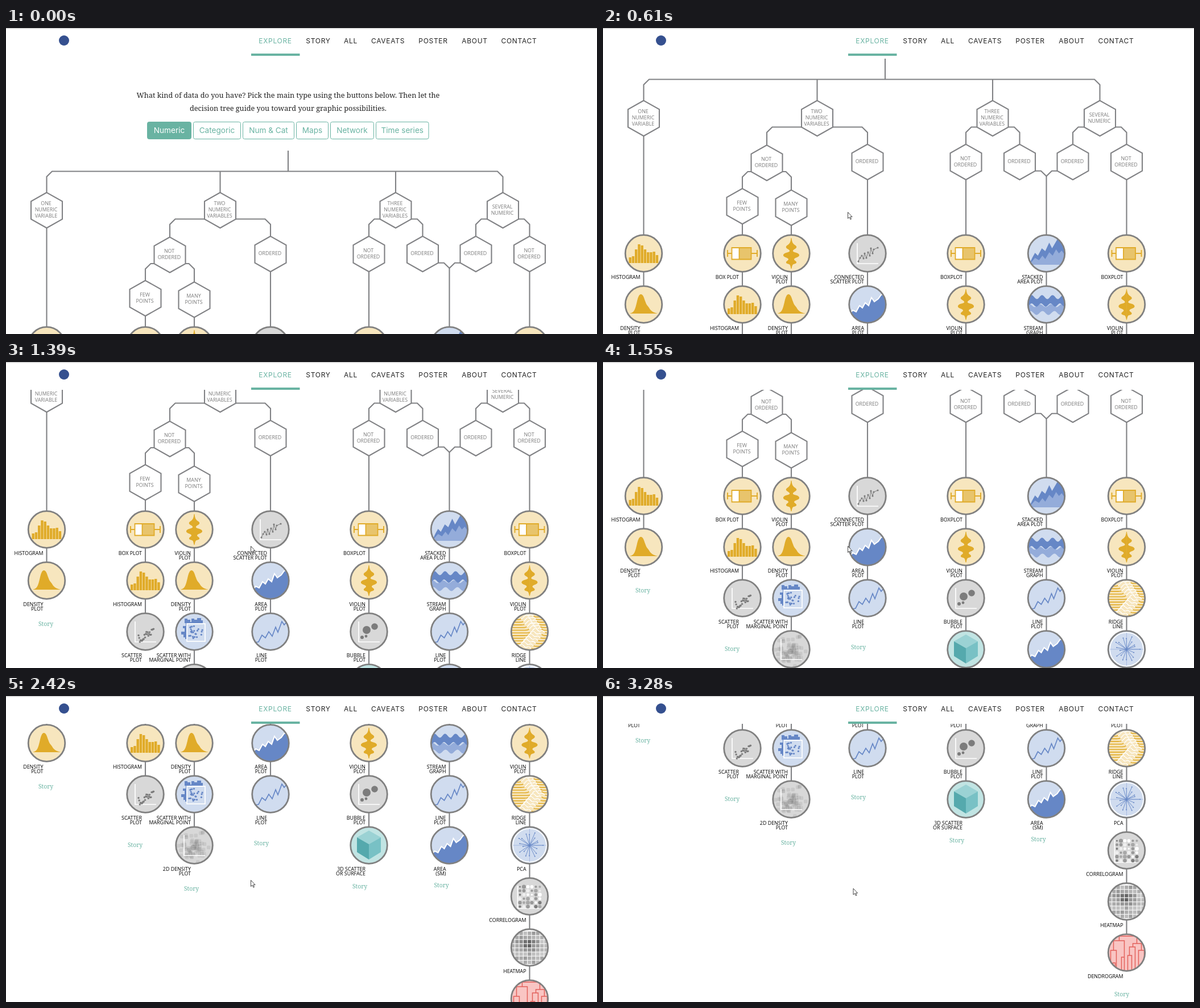
Recreate the animation shown at these times as an HTML page. Size 1039x539 px, loop 3360 ms.

```html
<!DOCTYPE html>
<html lang="en">
<head>
<meta charset="utf-8">
<title>Chart decision tree</title>
<style>
  html, body { margin: 0; width: 100%; height: 100%; overflow: hidden; background: #fff; }
  svg { display: block; width: 1039px; height: 539px; }
  .nav { font: 12px Inter, sans-serif; letter-spacing: .7px; fill: #222; text-anchor: middle; }
  .btn { font: 13.6px Inter, sans-serif; text-anchor: middle; }
  .lead { font: 12.7px "Noto Serif", serif; fill: #222; text-anchor: middle; }
  .story { font: 10.4px "Noto Serif", serif; fill: #69b3a2; text-anchor: middle; }
  .node { font: 8.9px "Open Sans", sans-serif; fill: #7a7a7a; text-anchor: middle; }
  .label { font: 8.9px "Open Sans", sans-serif; fill: #000; text-anchor: end; }
  .wire { fill: none; stroke: #808184; stroke-width: 2.1; }
  .hex { fill: #fff; stroke: #808184; stroke-width: 2.1; }
</style>
</head>
<body>
<svg viewBox="0 0 1039 539" xmlns="http://www.w3.org/2000/svg">
  <defs><clipPath id="disc"><circle r="32"/></clipPath></defs>
  <g id="page"></g>
  <g id="header"></g>
  <path id="cursor" d="M0 0V11L2.6 8.7 4.4 12.7 6 12 4.3 8.1H7.6Z" fill="#fff" stroke="#333" stroke-width=".9"/>
</svg>
<script>
const GREEN = '#69b3a2', GOLD = '#e0ab29', BLUE = '#6687c6', PALE_BLUE = '#94acda', GRAY = '#7c7c7c';
const LOOP = 3360;

// Seeded generator, so that scattered marks are always the same.
function random(seed) {
  return () => {
    seed = (seed * 16807) % 2147483647;
    return seed / 2147483647;
  };
}
const range = (n, f) => Array.from({ length: n }, (_, i) => f(i)).join('');
const text = (cls, x, y, s, extra = '') => `<text class="${cls}" x="${x}" y="${y}" ${extra}>${s}</text>`;
const rect = (x, y, w, h, fill, extra = '') =>
  `<rect x="${x}" y="${y}" width="${w}" height="${h}" fill="${fill}" ${extra}/>`;
const dot = (x, y, r, fill, extra = '') => `<circle cx="${x}" cy="${y}" r="${r}" fill="${fill}" ${extra}/>`;
const line = (d, color, w) => `<path d="${d}" fill="none" stroke="${color}" stroke-width="${w}"/>`;
const shape = (d, fill, extra = '') => `<path d="${d}" fill="${fill}" ${extra}/>`;
const wire = d => `<path class="wire" d="${d}"/>`;
const axes = (x = -18, y = 18) => line(`M${x} -18V${y}H19`, '#fff', 1.7);

const RISE = '-33 19 -26 10 -20 13 -14 2 -9 6 -4 -3 2 2 7 -12 12 -5 19 -10 24 -17 33 -21';

const icons = {
  hist: () => [10, 12, 24, 33, 31, 24, 19, 19, 20, 14]
    .map((h, i) => rect(-26 + 5.25 * i, 17 - h, 4.4, h, GOLD)).join(''),

  density: () => shape('M-24.5 16C-16 14-15 8-12-4C-10-13-8-18-5-18C-1-18 0-13 3-5C5 1 6 1 9 5C12 11 16 14 25 16Z', GOLD),

  box: () => line('M-26 0H-19M15 0H26M-26-6V6M26-6V6', GOLD, 1.9) +
    rect(-18.5, -10, 13, 20.5, '#fff') + rect(-5.5, -10, 21, 20.5, '#e8c46c') +
    line('M-18.5-10H15.5V10.5H-18.5ZM-5.5-10V10.5', GOLD, 1.8),

  violin: () => [1, -1].map(s => shape(
    'M-.2-27H.4C1.5-20 2-18 6-15C10.5-12 10.5-10 5-7C2-5 2-3 6-2C16 0 16 5 10 7C4 9 4 11 7 13C11 16 9 18 4 19C1.5 20 1.5 23 .4 27H-.2Z',
    GOLD, `transform="scale(${s} 1)"`)).join(''),

  connected: () => {
    const pts = [[-16, 14], [-13, 8], [-10, 4], [-7, 9], [-5, 0], [-2, 8], [1, -2], [4, 4], [6, -9], [9, 0], [11, -7], [18, -10]];
    return axes() + line('M' + pts.join(' '), GRAY, 1) + pts.map(p => dot(p[0], p[1], 1.6, GRAY)).join('');
  },

  area: () => shape(`M${RISE} 33 33-33 33Z`, BLUE) + line(`M${RISE}`, '#fff', 2),

  line: () => line('M-28 19-21 18-15 6-9 11-3 0 3 8 9-8 13 1 20-18 24-12 29-18', BLUE, 1.7),

  scatter: () => {
    const rnd = random(41);
    return axes() + range(24, i => {
      const x = -12 + i * 1.15;
      return dot(x, 7 - x * .5 + (rnd() - .5) * 13, 1.7, GRAY);
    });
  },

  marginal: () => {
    const rnd = random(97);
    return shape('M-17-23H-12V-21H-7V-17H-5V-23H0V-21H5V-24H12V-20H15V-15H-17Z', BLUE) +
      shape('M-15-15V-10H-20V-6H-17V0H-23V5H-19V10H-16V13H-13.5V-15Z', BLUE) +
      `<rect x="-13" y="-14" width="32" height="31" fill="#d0dcef" stroke="#fff" stroke-width="1.7"/>` +
      range(24, () => dot(-9 + rnd() * 24, -10 + rnd() * 23, 1.6, BLUE));
  },

  density2d: () => {
    const rnd = random(23);
    const spread = w => (rnd() + rnd() + rnd() - 1.5) * w;
    return range(75, () => {
      const x = spread(22), y = spread(24);
      return rect(x - 3 - y * .15, y - 3, 6.5, 6.5, '#555', 'opacity=".11" rx="1.5"');
    }) + dot(-2, 4, 5, '#555', 'opacity=".28"') + axes();
  },

  stacked: () => shape('M-29 17-25 8-20-1-15 4-8-9-2-4 5-19 10-9 20-26 25-22 33-18V20H-29Z', BLUE) +
    shape('M-29 18-20 8-13 12-7 4-2 10 5-2 11 4 17-7 22 0 27-5 33 4V20H-29Z', PALE_BLUE),

  stream: () => {
    const edge = (y, amp, f, p) => Array.from({ length: 34 }, (_, i) => {
      const x = -33 + 2 * i;
      return [x, (y + amp * Math.sin(x * f + p)).toFixed(1)];
    });
    const band = (a, b, c) => shape('M' + a.concat(b.reverse()).join(' ') + 'Z', c);
    return band(edge(2, 2.6, .33, 2), edge(15, 3.5, .3, .5), PALE_BLUE) +
      band(edge(-13, 3.6, .34, 1), edge(1, 3, .38, 2), BLUE);
  },

  bubble: () => axes() + dot(-4, -3, 7, GRAY) + dot(10, -9, 5.8, GRAY) + dot(-12, 10, 3, GRAY) + dot(-5, 8, 2.4, GRAY),

  cube: () => shape('M0-26 21-14 0-2-21-14Z', '#9bd2d4') +
    shape('M-21-14 0-2V25L-21 12Z', '#55a9ad') + shape('M21-14 0-2V25L21 12Z', '#78c1c5'),

  ridge: () => range(13, i => {
    const y = -26 + 4.7 * i, c = i < 6 ? -9 + i * 3 : 10 - (i - 6) * 4;
    const pts = Array.from({ length: 34 }, (_, k) => {
      const x = -33 + 2 * k;
      const h = 8 * Math.exp(-(((x - c) / 6) ** 2)) + 4 * Math.exp(-(((x - c - 12) / 4) ** 2));
      return [x, (y - h).toFixed(1)];
    });
    const bump = pts.filter(p => y - p[1] > .8);
    return shape('M' + pts.join(' '), '#f7e6be') + line('M' + pts.join(' '), GOLD, 1.6) +
      line('M' + bump.join(' '), '#fff', 1.8);
  }),

  pca: () => {
    const rnd = random(7);
    return `<circle r="29.5" fill="none" stroke="#fff" stroke-width="1.6"/>` +
      line('M-29 0H29M0-29V29', '#9db3dc', .8) +
      range(18, i => {
        const a = i * .349 + rnd() * .25, r = 11 + rnd() * 14;
        const x = (r * Math.cos(a)).toFixed(1), y = (r * Math.sin(a)).toFixed(1);
        return line(`M0 0L${x} ${y}`, BLUE, .9) + dot(x, y, 1, BLUE);
      });
  },

  correl: () => {
    const rnd = random(311), tones = ['#fff', '#efefef', '#a8a8a8', '#999', GRAY];
    return line('M-21-19V21H20', '#fff', 1.7) + range(36, i =>
      dot(-17 + 7 * (i % 6), -17 + 7 * Math.floor(i / 6), (1.6 + rnd() * 2).toFixed(1), tones[Math.floor(rnd() * 5)]));
  },

  heatmap: () => {
    const rnd = random(59);
    return range(72, i => {
      const x = -32.5 + 7.3 * (i % 9), y = -28 + 7.3 * Math.floor(i / 9);
      const near = Math.exp(-((x + 7) ** 2 + (y + 11) ** 2) / 160);
      const v = Math.round(205 - 75 * near - 50 * rnd());
      return rect(x, y, 6.1, 6.1, `rgb(${v},${v},${v})`);
    });
  },

  // Each fork: left x, right x, top, left foot, right foot.
  dendro: () => [
    [-13, 18, -29, -21, -16], [-23, -4, -21, -4, 33], [-28, -18, -4, 33, 33], [11, 26, -16, -10, -4],
    [5, 15, -10, 5, 33], [2, 9, 5, 33, 33], [21, 31, -4, 33, 33], [-9, -4, 8, 33, 8], [-24, -20, 18, 33, 33]
  ].map(([a, b, y, p, q]) => line(`M${a} ${p}V${y}H${b}V${q}`, '#e2605b', 1.5)).join('')
};

const fills = { connected: 'g', scatter: 'g', density2d: 'g', bubble: 'g', correl: 'g', heatmap: 'w', cube: 't', dendro: 'r',
  area: 'b', line: 'b', marginal: 'b', stacked: 'b', stream: 'b', pca: 'b' };
const tones = { g: '#d8d8d8', w: '#f6f6f6', t: '#c1e4e3', r: '#f9c5c3', b: '#d0dcef', y: '#f7e6be' };

// Each column: x, top of its stem, story x and y, then charts with their labels.
const columns = [
  [71.5, 352, 70, 725, ['hist', 'HISTOGRAM'], ['density', 'DENSITY/PLOT']],
  [245, 507, 227, 828, ['box', 'BOX PLOT'], ['hist', 'HISTOGRAM'], ['scatter', 'SCATTER/PLOT']],
  [331, 509, 326, 905, ['violin', 'VIOLIN/PLOT'], ['density', 'DENSITY/PLOT'],
    ['marginal', 'SCATTER WITH/MARGINAL POINT'], ['density2d', '2D DENSITY/PLOT']],
  [465, 429, 449, 825, ['connected', 'CONNECTED/SCATTER PLOT'], ['area', 'AREA/PLOT'], ['line', 'LINE/PLOT']],
  [638, 429, 622, 901, ['box', 'BOXPLOT'], ['violin', 'VIOLIN/PLOT'], ['bubble', 'BUBBLE/PLOT'], ['cube', '3D SCATTER/OR SURFACE']],
  [779.5, 423, 765.5, 899.5, ['stacked', 'STACKED/AREA PLOT'], ['stream', 'STREAM/GRAPH'], ['line', 'LINE/PLOT'], ['area', 'AREA/(SM)']],
  [920.5, 429, 912, 1172, ['box', 'BOXPLOT'], ['violin', 'VIOLIN/PLOT'], ['ridge', 'RIDGE/LINE'], ['pca', 'PCA'],
    ['correl', 'CORRELOGRAM'], ['heatmap', 'HEATMAP'], ['dendro', 'DENDROGRAM']]
];

const nodes = [
  [71.5, 321, 'ONE/NUMERIC/VARIABLE'], [376.5, 321, 'TWO/NUMERIC/VARIABLES'],
  [685, 321, 'THREE/NUMERIC/VARIABLES'], [873.5, 321, 'SEVERAL/NUMERIC'],
  [288, 399.5, 'NOT/ORDERED'], [465, 398, 'ORDERED'], [638, 398, 'NOT/ORDERED'],
  [732.5, 398, 'ORDERED'], [826, 398, 'ORDERED'], [920.5, 398, 'NOT/ORDERED'],
  [245, 476, 'FEW/POINTS'], [331, 478.5, 'MANY/POINTS']
];

function drawNode([x, y, s]) {
  const words = s.split('/');
  return `<path class="hex" d="M${x} ${y - 31.2}l27.5 15.6v31.2l-27.5 15.6l-27.5-15.6v-31.2z"/>` +
    words.map((w, i) => text('node', x - 1, y + 2.3 + (i - (words.length - 1) / 2) * 11, w)).join('');
}

function drawColumn([x, top, storyX, storyY, ...charts]) {
  const yOf = i => 559 + 90 * i;
  return wire(`M${x} ${top}V${yOf(charts.length - 1)}`) + charts.map(([kind, label], i) => {
    const y = yOf(i);
    return `<g transform="translate(${x} ${y})"><g clip-path="url(#disc)">` +
      dot(0, 0, 32, tones[fills[kind] || 'y']) + icons[kind]() + '</g>' +
      '<circle r="32.3" fill="none" stroke="#808080" stroke-width="2.8"/></g>' +
      label.split('/').map((s, k) => text('label', x - 6, y + 44.5 + 8.6 * k, s)).join('');
  }).join('') + text('story', storyX, storyY + 3.8, 'Story');
}

function drawPage() {
  const buttons = [['Numeric', 248.5, 325.5], ['Categoric', 329.5, 412.5], ['Num &amp; Cat', 416.5, 506.5],
    ['Maps', 510.5, 566.5], ['Network', 570.5, 646.5], ['Time series', 650.5, 743]];
  // Arm from a node's side to the child below it.
  const arm = (x, y, cx, end) => {
    const s = Math.sign(cx - x);
    return wire(`M${x} ${y}H${cx - 9.5 * s}L${cx} ${y + 9.5}V${end}`);
  };
  return text('lead', 496, 122.7, 'What kind of data do you have? Pick the main type using the buttons below. Then let the') +
    text('lead', 496, 145.5, 'decision tree guide you toward your graphic possibilities.') +
    buttons.map(([s, a, b], i) =>
      rect(a, 165.5, b - a, 30, i ? '#fff' : GREEN, `rx="3" stroke="${GREEN}"`) +
      text('btn', (a + b) / 2, 185.3, s, `fill="${i ? GREEN : '#fff'}"`)).join('') +
    wire('M496 216V252.5M71.5 290V262L81 252.5H864L873.5 262V290M376.5 252.5V290M685 252.5V290') +
    arm(349, 336.5, 288, 369) + arm(404, 336.5, 465, 367) +
    arm(657.5, 336.5, 638, 367) + arm(712.5, 336.5, 732.5, 367) +
    arm(846, 336.5, 826, 367) + arm(901, 336.5, 920.5, 367) +
    arm(260.5, 415, 245, 445) + arm(315.5, 415, 331, 448) +
    wire('M760 413.7H770L779.5 423L789 413.7H799') +
    columns.map(drawColumn).join('') + nodes.map(drawNode).join('');
}

function drawHeader() {
  const items = [['EXPLORE', 473.5], ['STORY', 549], ['ALL', 606], ['CAVEATS', 671.5],
    ['POSTER', 751], ['ABOUT', 824], ['CONTACT', 902]];
  return rect(0, 0, 1039, 49, '#fff') + rect(0, 0, 1039, 1.5, '#d2d2d2') +
    dot(102, 22, 9, '#35508f') + rect(431, 45, 85.5, 4, GREEN) +
    items.map(([s, x], i) => text('nav', x, 27.3, s, i ? '' : `style="fill:${GREEN}"`)).join('');
}

// Wheel notches: the view holds between steps.
const scrolls = [[0, 0], [370, 20], [450, 71], [530, 132], [610, 162],
  [1150, 175], [1230, 214], [1310, 240], [1390, 264], [1470, 304], [1550, 323],
  [1710, 343], [1790, 394], [1870, 455], [1950, 485],
  [2260, 500], [2340, 544], [2420, 566], [2810, 581], [2890, 625], [2970, 647]];
const moves = [[0, -50, -50], [70, 664, 82], [150, 259, 411], [220, 430.5, 324.5], [3280, 440, 339]];
const at = (steps, t) => steps.filter(s => s[0] <= t).pop();

const $ = id => document.getElementById(id);
$('page').innerHTML = drawPage();
$('header').innerHTML = drawHeader();

function render(t) {
  const [, x, y] = at(moves, t);
  $('page').setAttribute('transform', `translate(0 ${-at(scrolls, t)[1]})`);
  $('cursor').setAttribute('transform', `translate(${x} ${y})`);
}

const start = performance.now();
function tick() {
  render((performance.now() - start) % LOOP);
  requestAnimationFrame(tick);
}
tick();
</script>
</body>
</html>
```
